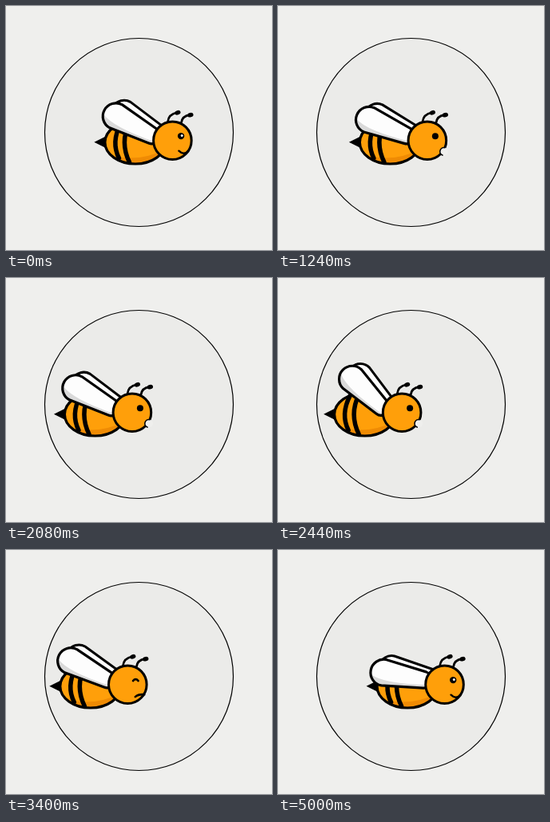
An HTML page that plays this animation: 333 by 306 pixels, repeating every 5040 ms.

```html
<!DOCTYPE html>
<html lang="en">
<head>
<meta charset="utf-8">
<title>Bee in the wind</title>
<style>
html, body { margin: 0; width: 100%; height: 100%; overflow: hidden; background: #efefed; }
svg { display: block; }
</style>
</head>
<body>
<svg width="333" height="306" viewBox="0 0 333 306">
  <defs>
    <clipPath id="porthole"><circle cx="166.5" cy="158.5" r="118"/></clipPath>
    <g id="wing">
      <path fill="#fdfdfd" d="M-52-16.5L0-10.5Q8-9 8 0Q8 9 0 10L-52 16.5A16.5 16.5 0 0 1-52-16.5Z"/>
      <path fill="#dadada" d="M-67 5Q-50 14 6 5Q5 9 0 10L-52 16.5Q-65 15-67 5Z"/>
      <path fill="none" stroke="#000" stroke-width="3.2" d="M-52-16.5L0-10.5Q8-9 8 0Q8 9 0 10L-52 16.5A16.5 16.5 0 0 1-52-16.5Z"/>
    </g>
  </defs>
  <circle cx="166.5" cy="158.5" r="118" fill="#ebebe9"/>
  <g clip-path="url(#porthole)">
    <g id="bee" fill="none" stroke-linecap="round" stroke-linejoin="round">
      <path fill="#000" d="M-98 2L-83-5.5V9.5Z"/>
      <ellipse cx="-46.5" cy="2.3" rx="38" ry="27" fill="#ff9f0a"/>
      <path fill="#ef8b04" d="M-72 20Q-38 26-12 12Q-22 29-46 29Q-62 29-72 20Z"/>
      <path stroke="#000" stroke-width="5.5" d="M-65-21Q-77 2-67 22M-54-22Q-66 2-54 27"/>
      <ellipse cx="-46.5" cy="2.3" rx="38" ry="27" stroke="#000" stroke-width="3.2"/>
      <use id="back" href="#wing"/>
      <use id="front" href="#wing"/>
      <path stroke="#000" stroke-width="2.7" d="M-6-23Q-5-33 6-35M11-22Q12-31 22-32"/>
      <g fill="#000">
        <ellipse rx="3.7" ry="2.7" transform="translate(6.5-35)rotate(-20)"/>
        <ellipse rx="3.7" ry="2.7" transform="translate(22.5-32)rotate(-15)"/>
      </g>
      <circle r="23.8" fill="#ff9f0a" stroke="#000" stroke-width="3"/>
      <g id="smile">
        <circle cx="10.7" cy="-5.6" r="4.2" fill="#000"/>
        <circle cx="11.8" cy="-6.3" r="1.5" fill="#fff"/>
        <path stroke="#000" stroke-width="2.4" d="M8 13Q14.5 19.5 20.5 12"/>
      </g>
      <g id="gasp">
        <circle cx="10" cy="-5.5" r="4" fill="#000"/>
        <circle cx="21" cy="13.8" r="5" fill="#efefed"/>
        <path stroke="#000" stroke-width="1.6" d="M22 8.9A5 5 0 0 0 19 18.4"/>
      </g>
      <g id="frown" stroke="#000" stroke-width="2.6">
        <path d="M6.7-4.6Q10-8.5 13.3-4.6"/>
        <path d="M9.5 15.5Q13 12 21 12.5"/>
      </g>
    </g>
  </g>
  <circle cx="166.5" cy="158.5" r="118" fill="none" stroke="#000" stroke-width="1.2"/>
</svg>
<script>
const LOOP = 5040, STEP = 40, REENTRY = 4160;
const drift = [[0, 208.4], [840, 201], [1680, 169.4], [2360, 154], [2680, 166], [2960, 178],
  [3320, 158], [3400, 152.3], [3920, 38], [4160, -30]];
// Wing beats completed by each time
const beats = [[0, .01], [840, 5.75], [1680, 11.55], [2440, 16.25], [3400, 23],
  [4280, 28.75], [5000, 33.75], [5040, 34.01]];
const el = id => document.getElementById(id);

// Smooth curve through [time, value] points
function curve(keys, t) {
  let i = 0;
  while (i < keys.length - 2 && t >= keys[i + 1][0]) i++;
  const slope = k => {
    const a = keys[Math.max(k - 1, 0)], b = keys[Math.min(k + 1, keys.length - 1)];
    return (b[1] - a[1]) / (b[0] - a[0]);
  };
  const [t0, v0] = keys[i], [t1, v1] = keys[i + 1];
  const d = t1 - t0, s = (t - t0) / d, r = 1 - s;
  return v0 * r * r * (1 + 2 * s) + v1 * s * s * (1 + 2 * r)
    + d * s * r * (slope(i) * r - slope(i + 1) * s);
}

function place(id, x, y, angle = 0, scale = 1) {
  el(id).setAttribute('transform', `translate(${x} ${y}) rotate(${angle}) scale(${scale})`);
}

function draw(now) {
  const t = Math.floor(now % LOOP / STEP) * STEP;
  // Blown out on the left, the bee returns tail first from the right
  const x = t < REENTRY ? curve(drift, t) : 208.4 + 159 * ((LOOP - t) / 760) ** 2.4;
  const flap = 27.5 + 17 * Math.sin(2 * Math.PI * curve(beats, t));
  place('bee', x, 168.7);
  place('front', -25, -5.5, flap);
  place('back', -18, -9.7, flap + 2, .95);
  const face = t < 1240 || t >= REENTRY ? 'smile' : t < 2560 ? 'gasp' : 'frown';
  for (const id of ['smile', 'gasp', 'frown']) el(id).style.display = id === face ? '' : 'none';
}

const start = performance.now();
function tick() {
  draw(performance.now() - start);
  requestAnimationFrame(tick);
}
tick();
</script>
</body>
</html>
```
